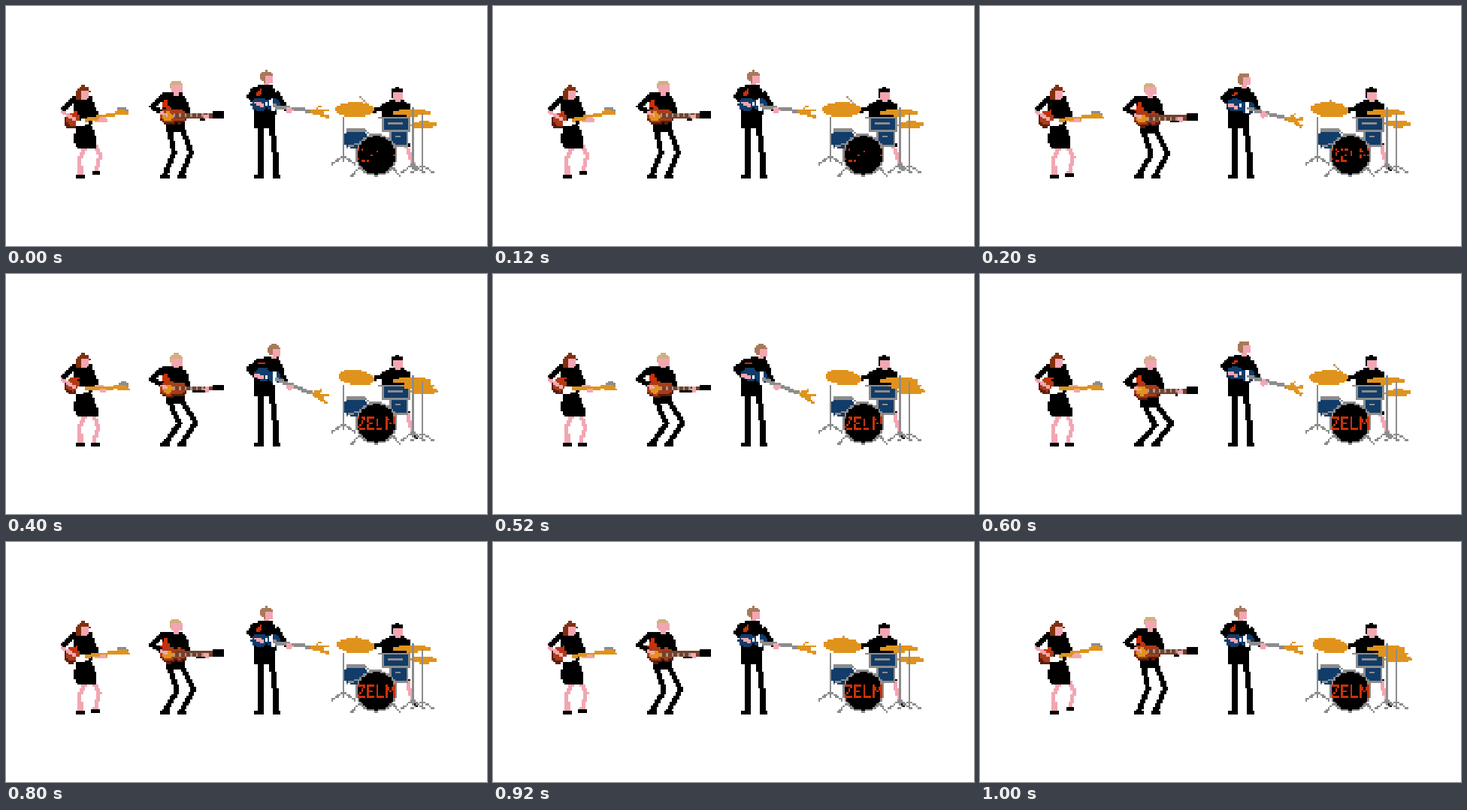
An HTML page with a canvas that plays this animation: 640 by 320 pixels, repeating every 1.2 s.

```html
<!DOCTYPE html>
<html lang="en">
<head>
<meta charset="utf-8">
<title>Pixel band</title>
<style>
  html, body { margin: 0; width: 100%; height: 100%; overflow: hidden; background: #fff; }
  canvas { display: block; width: 100vw; height: 100vh; image-rendering: pixelated; }
</style>
</head>
<body>
<canvas id="stage" width="256" height="128"></canvas>
<script>
const ctx = document.getElementById('stage').getContext('2d');
const CELL = 2.5, STEP = 200, STEPS = 6;
const BLACK = '#000', WHITE = '#fff', SKIN = '#f2a6b2', GOLD = '#e0931c', GREY = '#8c8c8c',
      BLUE = '#123c69', RED = '#cb3009', RUST = '#ac3b17', DARK = '#5a1d0c', BROWN = '#80300e';

// Fill every cell whose centre passes the test; shapes use stage pixels.
function plot(color, x0, y0, x1, y1, inside) {
  ctx.fillStyle = color;
  for (let j = Math.floor(y0 / CELL); j <= y1 / CELL; j++)
    for (let i = Math.floor(x0 / CELL); i <= x1 / CELL; i++)
      if (inside((i + .5) * CELL, (j + .5) * CELL)) ctx.fillRect(i, j, 1, 1);
}

function rect(color, x0, y0, x1, y1) {
  plot(color, x0, y0, x1, y1, (x, y) => x >= x0 && x < x1 && y >= y0 && y < y1);
}

// Four-sided shape whose left and right edges slide between two heights.
function taper(color, y0, l0, r0, y1, l1, r1) {
  plot(color, Math.min(l0, l1), y0, Math.max(r0, r1), y1, (x, y) => {
    const t = (y - y0) / (y1 - y0);
    return t >= 0 && t < 1 && x >= l0 + (l1 - l0) * t && x < r0 + (r1 - r0) * t;
  });
}

function oval(color, cx, cy, rx, ry, tilt = 0) {
  const c = Math.cos(tilt), s = Math.sin(tilt), r = Math.max(rx, ry);
  plot(color, cx - r, cy - r, cx + r, cy + r, (x, y) => {
    const u = (x - cx) * c + (y - cy) * s, v = (y - cy) * c - (x - cx) * s;
    return (u / rx) ** 2 + (v / ry) ** 2 <= 1;
  });
}

function line(color, width, ...p) {
  const r = width / 2;
  for (let i = 0; i + 3 < p.length; i += 2) {
    const [ax, ay, bx, by] = p.slice(i, i + 4), vx = bx - ax, vy = by - ay;
    plot(color, Math.min(ax, bx) - r, Math.min(ay, by) - r, Math.max(ax, bx) + r, Math.max(ay, by) + r,
      (x, y) => {
        const t = Math.min(1, Math.max(0, ((x - ax) * vx + (y - ay) * vy) / (vx * vx + vy * vy)));
        return Math.hypot(x - ax - t * vx, y - ay - t * vy) <= r;
      });
  }
}

const wire = (...p) => line(GREY, 2.6, ...p);

// Two equal bones from hip to foot; the knee bends to the given side.
function leg(color, width, hx, hy, fx, fy, bone, side = 1) {
  const dx = fx - hx, dy = fy - hy, d = Math.hypot(dx, dy);
  const bend = side * Math.sqrt(Math.max(0, bone * bone - d * d / 4)) / d;
  line(color, width, hx, hy, (hx + fx) / 2 + bend * dy, (hy + fy) / 2 - bend * dx, fx, fy);
}

const shoe = (x, y) => rect(BLACK, x, y - 5, x + 12, y);

function head(x, y, hair, face) {
  oval(hair, x, y, 8.5, 8);
  rect(SKIN, x - face, y - 2, x + 8, y + 8);
  rect(SKIN, x - 3, y + 8, x + 4, y + 12);
}

// Place a tool in a turned frame: at(u, v) is u along the neck and v across.
const frame = (x, y, a) => (u, v = 0) =>
  [x + u * Math.cos(a) - v * Math.sin(a), y + u * Math.sin(a) + v * Math.cos(a)];

function singer(k) {
  const a = .09 * k - .2, at = frame(105, 152, a);
  const lift = 5 - 2.5 * k;
  leg(SKIN, 5.5, 107, 184, 99, 224, 21, -1);
  leg(SKIN, 5.5, 115, 180 + 2 * k, 120 - 1.5 * k, 224 - lift, 21);
  shoe(92, 230);
  shoe(114 - k, 230 - lift);

  taper(BLACK, 160, 94, 114, 178, 89, 121);
  taper(BLACK, 177, 89, 121, 189, 95, 119 + 2 * k);
  taper(BLACK, 121, 88, 114, 150, 92, 117);
  taper(BLACK, 150, 94, 115, 162, 95, 113);
  line(BLACK, 8, 87, 127, 77, 137);
  line(BLACK, 8, 112, 127, 119, 146);

  oval(DARK, ...at(-18, -2), 10, 10);
  oval(RUST, ...at(-16, -5), 9, 9);
  line(RED, 4, ...at(-16, -10), ...at(-9, -13));
  line(WHITE, 9, ...at(-9, 3), ...at(0, 2));
  rect(WHITE, 85, 132, 88, 137);
  line(SKIN, 5, 74, 141, 84, 146, 91, 151);

  line(SKIN, 6, 119, 151, 132, 152);
  line(GOLD, 5, ...at(2), ...at(52));
  oval(SKIN, ...at(24, 3), 4, 3);
  oval(GOLD, ...at(50, -1), 8, 5, a);
  line(GOLD, 4, ...at(44, 1), ...at(57, 3));
  wire(...at(45, -6), ...at(54, -6), ...at(57, -2));

  head(103, 114, BROWN, 2);
  rect(BROWN, 92, 112, 99, 124);
}

function guitarist(k) {
  const d = 3.2 * k, y = 145.5 + d;
  leg(BLACK, 7, 217, 163 + d, 211, 226, 33);
  leg(BLACK, 7, 234, 163 + d, 233, 226, 34);
  shoe(205, 230);
  shoe(227, 230);

  taper(BLACK, 116 + d, 207, 234, 128 + d, 204, 241);
  taper(BLACK, 128 + d, 207, 241, 167 + d, 213, 237);
  line(BLACK, 7, 207, 121 + d, 194, 134 + d, 207, 141 + d);
  line(BLACK, 7, 237, 125 + d, 243, y, 262, y + 3);
  line(WHITE, 2.6, 203, 133 + d, 207, 130 + d);
  taper(RED, 125 + d, 210, 215, 136 + d, 206, 217);

  oval(DARK, 217, y + 2, 12, 11);
  oval(DARK, 231, y + 2, 10, 9);
  oval(RUST, 216, y, 11, 10);
  oval(RUST, 230, y, 9, 8);
  oval(GOLD, 215, y + 1, 7, 6);
  line(SKIN, 4, 206, y - 3, 213, y - 1);
  rect('#74402c', 226, y - 3, 280, y + 4);
  for (let x = 222; x < 272; x += 7.5) rect('#a5988a', x, y - 2, x + 4, y + 3);
  rect(BLACK, 275, y - 5, 291, y + 4);
  oval(SKIN, 267, y + 2, 4, 3.5);

  head(226, 107 + d, '#d2af80', 5);
}

function bassist(k) {
  const lean = 4 * k, y = 3 * k;
  line(BLACK, 7.5, 338, 160, 337.5, 226);
  line(BLACK, 7.5, 353, 160, 357, 185, 359, 226);
  shoe(331, 230);
  shoe(354, 230);

  taper(BLACK, 105 + y, 335 + lean, 354 + lean, 122, 322, 363 + lean / 2);
  taper(BLACK, 122, 326, 363 + lean / 2, 148, 331, 358);
  taper(BLACK, 148, 330, 358, 163, 331, 358);
  line(BLACK, 7, 332 + lean / 2, 110 + y, 323, 120 + y, 331, 128 + y);
  line(RED, 4, 334 + lean / 2, 119, 339 + lean / 2, 113 + y);

  const a = .13 + .12 * k, at = frame(357 + 1.5 * k, 133.5 + 3.5 * k, a);
  oval(BLUE, ...at(-20, 0), 11, 9);
  oval(BLUE, ...at(-2, -2), 11, 8);
  line(WHITE, 5, ...at(-5, -7), ...at(-2, 5));
  rect(WHITE, 344, 128 + y, 348, 133 + y);
  line(SKIN, 5, 333, 129 + y, 340, 132 + y);
  line(BLACK, 6, 361 + lean / 2, 116 + y, 367, 127 + y, 372, 136 + 4 * k);
  line(GREY, 5, ...at(0), ...at(50));
  oval(SKIN, ...at(20, 3), 5, 4);
  oval(GOLD, ...at(58, 0), 9, 4.5, a);
  line(GOLD, 3, ...at(55, -3), ...at(60, -8));
  line(GOLD, 3, ...at(60, -1), ...at(72, -5));
  line(GOLD, 4, ...at(60, 2), ...at(72, 5));

  head(346 + 5 * k, 94 + 3.5 * k, '#a8785a', 2);
}

// Strokes of the four letters, in cells.
const LETTERS = [
  [0, 0, 3, 0, 3, 1, 0, 5, 0, 6, 3, 6],
  [8, 0, 5, 0, 5, 6, 8, 6],
  [5, 3, 7, 3],
  [10, 0, 10, 6, 13, 6],
  [15, 6, 15, 0, 17, 3, 19, 0, 19, 6]
];

const noise = (i, j) => {
  const n = Math.sin(i * 12.9898 + j * 78.233) * 43758.5453;
  return n - Math.floor(n);
};

// Lettering that appears cell by cell.
function lettering(share) {
  ctx.fillStyle = RED;
  for (const p of LETTERS)
    for (let i = 0; i + 3 < p.length; i += 2) {
      const dx = p[i + 2] - p[i], dy = p[i + 3] - p[i + 1];
      const n = Math.max(Math.abs(dx), Math.abs(dy));
      for (let s = 0; s <= n; s++) {
        const x = Math.round(p[i] + dx * s / n), y = Math.round(p[i + 1] + dy * s / n);
        if (noise(x, y) < share) ctx.fillRect(187 + x, 76 + y, 1, 1);
      }
    }
}

function stand(x, top, hub, spread) {
  wire(x, top, x, hub + 6);
  wire(x - spread, hub + 10, x, hub, x + spread, hub + 10);
}

function drum(x0, y0, x1, y1) {
  rect(GREY, x0, y0, x1, y1);
  rect(BLUE, x0 + CELL, y0 + CELL, x1 - CELL, y1 - CELL);
  wire(x0 + 9, y0 + 8, x1 - 11, y0 + 8);
}

function drummer(k, share) {
  const tap = Math.min(k, 1);
  taper(BLACK, 125, 511, 528, 131, 502, 536);
  rect(BLACK, 501, 131, 538, 150);
  line(BLACK, 6, 505, 134, 490, 139);
  head(520, 116, BLACK, 5);
  rect(BLACK, 514, 110, 526, 115);

  line(BLACK, 8, 525, 178, 533, 185);
  line(SKIN, 5.5, 533, 188 - 4 * tap, 543 - 3 * tap, 214 - 6 * tap);
  line(tap ? BLACK : GREY, 5, 541 + tap, 214 + tap, 545, 219);

  stand(448.75, 148, 200, 15);
  stand(541.25, 138, 211, 14);
  stand(553.75, 141, 212, 15);

  oval(BLUE, 465, 177, 16, 14);
  wire(452, 165, 477, 165, 483, 171);
  wire(453, 188, 470, 183);
  drum(510, 165, 535, 187.5);
  drum(500, 147.5, 537.5, 167.5);
  wire(496, 148.75, 510, 148.75);
  rect('#b87c5c', 516, 186, 521, 206);

  wire(469, 216, 460, 226);
  wire(515, 216, 524, 227);
  oval(GREY, 492.5, 198.5, 28, 28);
  oval(BLACK, 492.5, 198.5, 25.5, 25.5);
  lettering(share);

  const swing = 2.33 + .3 * k;
  line('#b39a82', 2.6, 488, 139, 488 - 0 + 24 * Math.cos(swing), 139 - 24 * Math.sin(swing));
  oval(GOLD, 464 + k, 138, 26 - k, 10, .06 * k);
  const plates = k < 2 ? 2 : 3;
  for (let i = 0; i < plates; i++) {
    const t = i / (plates - 1);
    oval(GOLD, 540 + 16 * t, 142 + (16 - k) * t, 26 - 8 * t, 4.5);
  }
  wire(541.25, 137, 541.25, 162);
  wire(553.75, 143, 553.75, 164);
}

function draw(s) {
  ctx.fillStyle = WHITE;
  ctx.fillRect(0, 0, 256, 128);
  singer(Math.min(s, 5 - s));
  guitarist(s < 4 ? s : 5 - s);
  bassist(Math.max(0, 2 - Math.abs(s - 2)));
  drummer(s % 3, Math.min(1, .14 + .36 * s));
}

const start = performance.now();
let shown = -1;
function tick() {
  const step = Math.floor((performance.now() - start) / STEP) % STEPS;
  if (step !== shown) draw(shown = step);
  requestAnimationFrame(tick);
}
tick();
</script>
</body>
</html>
```
